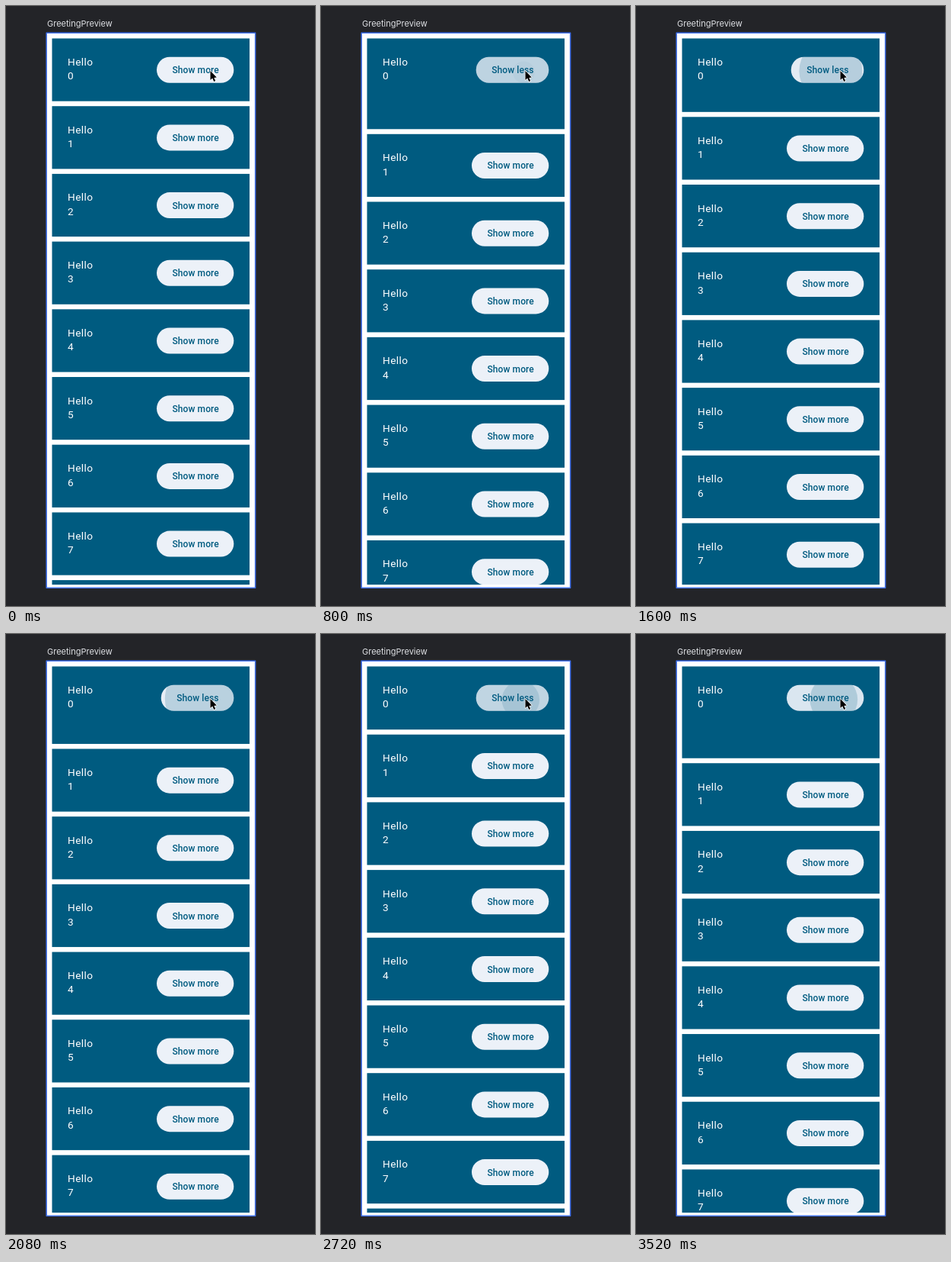
An HTML page with a canvas that plays this animation: 406x786 px, repeating every 3600 ms.

```html
<!DOCTYPE html>
<html lang="en">
<head>
<meta charset="utf-8">
<title>Expanding list</title>
<style>
  html, body { margin: 0; width: 100%; height: 100%; overflow: hidden; background: #232428; }
  canvas { display: block; }
</style>
</head>
<body>
<canvas id="stage" width="406" height="786"></canvas>
<script>
const ctx = document.getElementById('stage').getContext('2d');
const LOOP = 3600, STEP = 80;
const BLUE = '#005b80', LIGHT = '#ecf1f8';
const PITCH = 88.7, CARD_HEIGHT = 82.2, EXTRA = 41;

// Moments at which the first card toggles; even entries expand it.
const toggles = [200, 420, 640, 805, 1040, 1275, 1511, 1741, 1977, 2150, 2329, 2507, 2689, 2871, 3220, 3466];

// Damped spring, retargeted at every toggle with its velocity kept.
const OMEGA = Math.sqrt(200), DAMPING = 0.5;
const DECAY = OMEGA * DAMPING, FREQ = OMEGA * Math.sqrt(1 - DAMPING ** 2);

function springStep(pos, vel, target, seconds) {
  const y = pos - target;
  const fade = Math.exp(-DECAY * seconds);
  const c = Math.cos(FREQ * seconds), s = Math.sin(FREQ * seconds);
  return [
    target + fade * (y * c + (vel + DECAY * y) / FREQ * s),
    fade * (vel * c - (DECAY * vel + OMEGA ** 2 * y) / FREQ * s)
  ];
}

function cardState(time) {
  let pos = 0, vel = 0, expanded = false;
  toggles.forEach((start, i) => {
    if (start > time) return;
    const end = Math.min(time, toggles[i + 1] ?? LOOP);
    expanded = i % 2 === 0;
    [pos, vel] = springStep(pos, vel, expanded ? EXTRA : 0, (end - start) / 1000);
  });
  return { extra: Math.max(0, pos), expanded };
}

function text(str, x, y, font, color, spacing = 0) {
  ctx.font = font;
  ctx.letterSpacing = spacing + 'px';
  ctx.fillStyle = color;
  ctx.fillText(str, x, y);
}

function drawRipples(time) {
  const lead = 20, grow = 180, fadeIn = 75, hold = 225, fadeOut = 150;
  for (const toggle of toggles) {
    const age = time - toggle + lead;
    if (age <= 0 || age >= hold + fadeOut) continue;
    const p = Math.min(1, age / grow);
    const strength = Math.min(1, age / fadeIn, (hold + fadeOut - age) / fadeOut);
    ctx.fillStyle = `rgba(0, 91, 128, ${0.2 * strength})`;
    ctx.beginPath();
    ctx.arc(268 - 20 * p, 87 - 3 * p, 10 + 52 * p, 0, 2 * Math.PI);
    ctx.fill();
  }
}

function drawButton(y, expanded, time) {
  const left = expanded ? 203.7 : 198;
  ctx.save();
  ctx.beginPath();
  ctx.roundRect(left, y, 299.3 - left, 34, 17);
  ctx.fillStyle = LIGHT;
  ctx.fill();
  if (time !== undefined) {
    ctx.clip();
    drawRipples(time);
  }
  ctx.restore();
  text(expanded ? 'Show less' : 'Show more', left + 20.5, y + 21.5, '500 12px Roboto, sans-serif', BLUE, 0.09);
}

function drawCard(index, y, extra, expanded, time) {
  const font = '13.65px Roboto, sans-serif';
  ctx.fillStyle = BLUE;
  ctx.fillRect(60.5, y, 259.5, CARD_HEIGHT + extra);
  text('Hello', 81, y + 35.5, font, '#fff', 0.43);
  text(index, 81, y + 53.8, font, '#fff', 0.43);
  drawButton(y + 24.2, expanded, time);
}

function drawPointer() {
  ctx.beginPath();
  [[268.5, 85], [268.5, 97], [271.2, 94.6], [273.2, 99], [275.2, 98.1], [273.3, 93.9], [276.8, 93.6]]
    .forEach(([x, y]) => ctx.lineTo(x, y));
  ctx.closePath();
  ctx.lineWidth = 1.4;
  ctx.lineJoin = 'round';
  ctx.strokeStyle = '#fff';
  ctx.stroke();
  ctx.fillStyle = '#000';
  ctx.fill();
}

function draw(time) {
  const { extra, expanded } = cardState(time);
  ctx.fillStyle = '#232428';
  ctx.fillRect(0, 0, 406, 786);
  text('GreetingPreview', 54, 27, '11px Inter, sans-serif', '#dfe1e5');
  ctx.fillStyle = '#fff';
  ctx.fillRect(53, 35, 275, 727.5);
  ctx.strokeStyle = '#3f70ee';
  ctx.lineWidth = 1.5;
  ctx.strokeRect(53.2, 35.2, 274.4, 727);

  ctx.save();
  ctx.beginPath();
  ctx.rect(54, 36, 273, 722);
  ctx.clip();
  drawCard(0, 42.5, extra, expanded, time);
  for (let i = 1; i <= 8; i++) drawCard(i, 42.5 + PITCH * i + extra, 0, false);
  ctx.restore();
  drawPointer();
}

function tick() {
  const time = performance.now() % LOOP;
  draw(Math.floor(time / STEP) * STEP);
  requestAnimationFrame(tick);
}
tick();
</script>
</body>
</html>
```
